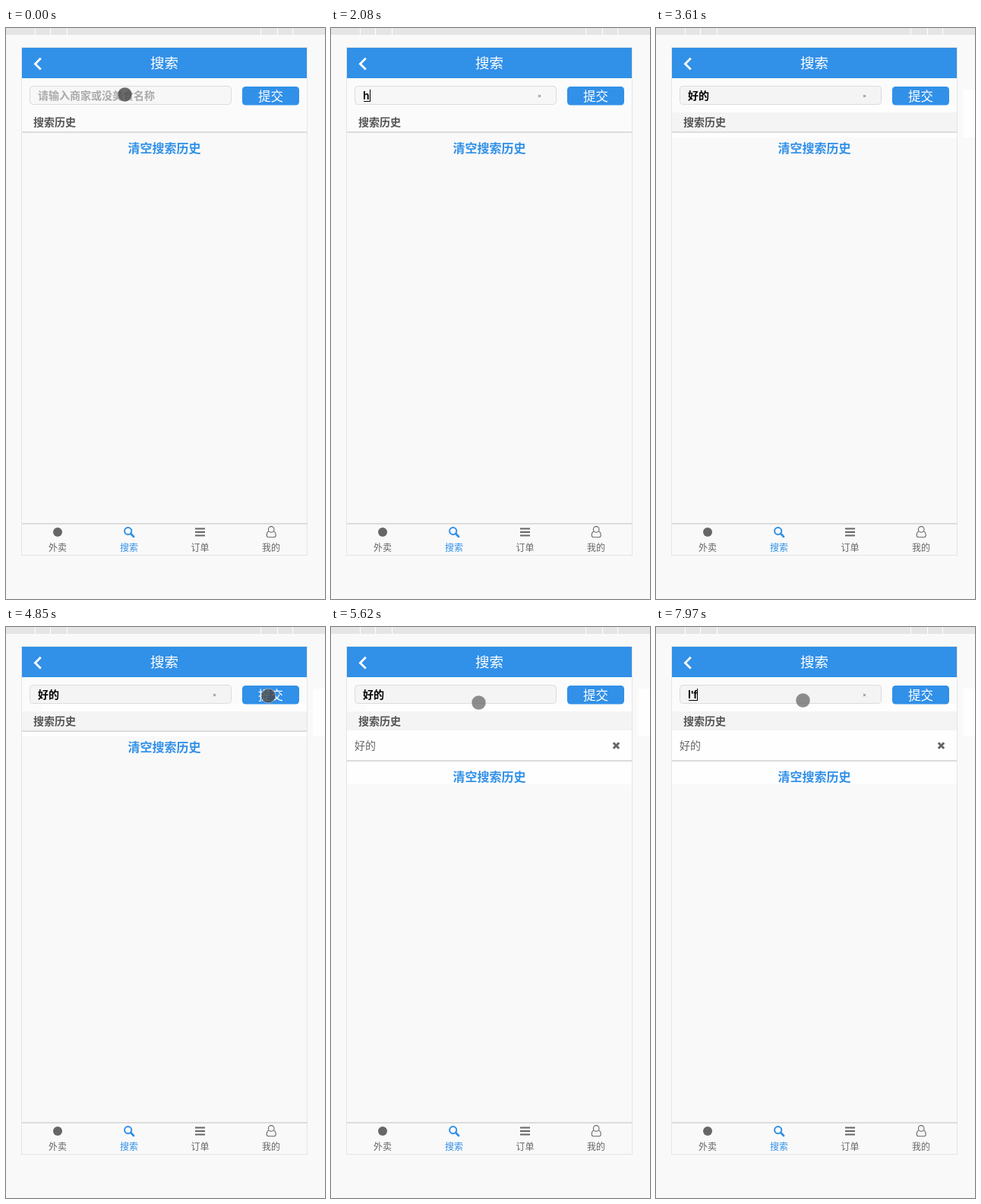
Write an HTML page that moves like this. It is 420 by 751 pixels and loops after 8000 ms.

```html
<!DOCTYPE html>
<html lang="zh-CN">
<head>
<meta charset="utf-8">
<title>搜索</title>
<style>
html, body { margin: 0; width: 100%; height: 100%; overflow: hidden; background: #f9f9f9; }
svg { display: block; width: 420px; height: 751px; }
text { font-family: "Noto Sans CJK SC", "Noto Sans CJK", sans-serif; white-space: pre; }
.bold { font-weight: 700; }
.mid { text-anchor: middle; }
.blue { fill: #3190e8; }
.gray { fill: #666; }
.field { font: 700 14px "Liberation Sans", "Noto Sans CJK SC", "Noto Sans CJK", sans-serif; }
.num { font: 13px "Open Sans", sans-serif; fill: #767676; }
.word { font-size: 17.3px; }
</style>
</head>
<body>
<svg viewBox="0 0 420 751">
  <rect width="420" height="751" fill="#f9f9f9"/>
  <rect width="420" height="9" fill="#e5e5e5"/>
  <path d="M38.5 0V9M58.5 0V9M80.5 0V9M335.5 0V9M357.5 0V9M377.5 0V9" stroke="#fff"/>

  <rect x="21" y="66" width="375" height="70" fill="#fbfbfb"/>
  <g id="shade">
    <path d="M404 81H420V144H404ZM46 101H396V111H46ZM21 138H396V144H21Z" fill="#fefefe"/>
    <rect x="21" y="111" width="375" height="25" fill="#f4f4f5"/>
  </g>
  <rect x="20.5" y="25.5" width="376" height="668" fill="none" stroke="#e5e5e5"/>

  <rect x="21" y="26" width="375" height="40" class="blue"/>
  <path d="M45.8 39.8L38.4 47.2L45.8 54.6" fill="none" stroke="#fff" stroke-width="2.8"/>
  <text x="208.5" y="53" font-size="18.5" class="mid" fill="#fff">搜索</text>

  <rect id="box" x="31.5" y="76.5" width="265" height="24" rx="4" stroke="#dcdcdc"/>
  <text id="hint" x="42" y="94" font-size="14" class="bold" fill="#aaa">请输入商家或没美食名称</text>
  <text id="typed" x="42" y="94" class="field"></text>
  <rect id="under" x="43" y="96" height="1"/>
  <rect id="caret" y="81" width="1" height="16"/>
  <path id="clear" d="M273 88L276 91M276 88L273 91" stroke="#555" stroke-width=".9"/>
  <rect x="311" y="77" width="75" height="24.5" rx="4.5" class="blue"/>
  <text x="348.5" y="96" font-size="16.5" class="mid" fill="#fff">提交</text>

  <text x="36" y="129" font-size="14" class="bold" fill="#555">搜索历史</text>
  <g id="item">
    <rect x="21" y="136" width="375" height="71" fill="#fefefe"/>
    <text x="31" y="161" font-size="14" class="gray">好的</text>
    <path d="M371.8 152.3L379.2 159.7M379.2 152.3L371.8 159.7" stroke="#666" stroke-width="3"/>
  </g>
  <g id="foot">
    <rect x="21" y="136" width="375" height="2" fill="#dcdcdc"/>
    <text x="208.5" y="164" font-size="16" class="mid bold blue">清空搜索历史</text>
  </g>

  <rect x="21" y="651" width="375" height="2" fill="#dcdcdc"/>
  <circle cx="68" cy="663" r="6" class="gray"/>
  <g fill="none" stroke="#3190e8">
    <circle cx="160.7" cy="661.6" r="4.6" stroke-width="2"/>
    <path d="M164.2 665.1L168 668.9" stroke-width="2.8" stroke-linecap="round"/>
  </g>
  <path d="M249 658.5H262M249 663H262M249 667.5H262" stroke="#666" stroke-width="2.2"/>
  <g fill="none" stroke="#666" stroke-width="1.1">
    <circle cx="349.2" cy="659.4" r="3.8"/>
    <path d="M346 662C343.9 662.6 343.3 665 343.3 667.3Q343.3 669.7 345.5 669.7H353Q355.2 669.7 355.2 667.3C355.2 665 354.5 662.6 352.4 662"/>
  </g>
  <g font-size="12" class="mid gray">
    <text x="68" y="688">外卖</text>
    <text x="162" y="688" class="blue">搜索</text>
    <text x="255.5" y="688">订单</text>
    <text x="349" y="688">我的</text>
  </g>

  <g id="ime">
    <rect x="50" y="101" width="10" height="43" fill="#fefefe"/>
    <rect x="60" y="100" width="360" height="44" fill="#fff"/>
    <path d="M60 100.5H420M60 143.5H420" stroke="#0078d7"/>
    <rect x="60" y="100" width="78" height="44" fill="#0078d7"/>
    <g id="words"></g>
    <path d="M397 120H405M397 123.5H405M397 127H405" stroke="#111" stroke-width="1.1"/>
  </g>
  <circle id="pointer" r="9.5"/>
</svg>
<script>
const LOOP = 8000;
const $ = id => document.getElementById(id);
const show = (id, on) => $(id).setAttribute("visibility", on ? "visible" : "hidden");
const set = (id, attrs) => {
  for (const k in attrs) $(id).setAttribute(k, attrs[k]);
};

// Latest entry whose start time has passed
const at = (track, t) => track.filter(e => e[0] <= t).pop();

// start, text, composing
const typing = [
  [0, ""], [2080, "h", true], [2230, "h'd", true], [3110, "好的"],
  [6650, "好"], [6770, ""], [7970, "l'f", true]
];
// start, x, y, pressed
const moves = [
  [0, 156.5, 87.5, true], [150, 411, 127], [270],
  [4610, 411, 127], [4730, 350, 89], [4850, 345.5, 90.5, true],
  [5230, 342.5, 92.5], [5380, 342.5, 103], [5500, 250, 102],
  [5620, 194.5, 99.5], [5740, 193.5, 96.5]
];
// Each time flips the caret, which begins hidden
const blinks = [150, 540, 1050, 1550, 2080, 2730, 3110, 3610, 4110, 4610, 6010, 6510, 6650, 7300, 7830];

const words = [["好的", 77, 87], ["很多", 154, 164.5], ["活动", 231, 241], ["好多", 308, 318.5], ["", 385, 0]];
$("words").innerHTML = words.map(([w, x, wx], i) => {
  const ink = i ? "" : ' style="fill:#fff"';
  return `<text class="num" x="${x}" y="129"${ink}>${i + 1}</text>` +
         `<text class="word" x="${wx}" y="129"${ink}>${w}</text>`;
}).join("");

let last = null;
function render(t) {
  const [, text, composing] = at(typing, t);
  if (text !== last) {
    $("typed").textContent = last = text;
  }
  const width = text ? $("typed").getComputedTextLength() : 0;
  show("hint", !text);
  show("clear", text && !(t >= 5230 && t < 6010));
  show("under", composing);
  set("under", { width: Math.max(0, Math.round(width) - 1) });
  set("caret", { x: 42 + Math.round(width) });
  show("caret", blinks.filter(b => b <= t).length % 2);

  const added = t >= 5230;
  show("ime", t >= 2230 && t < 3110);
  show("shade", t >= 3110);
  set("box", { fill: t >= 3110 ? "#f4f4f5" : "#f7f7f7" });
  show("item", added);
  set("foot", { transform: `translate(0 ${added ? 39 : 0})` });

  const [, x, y, pressed] = at(moves, t);
  show("pointer", x);
  if (x) set("pointer", {
    cx: x, cy: y,
    fill: pressed ? "#444" : "#666",
    "fill-opacity": pressed ? 0.78 : 0.74,
    stroke: "#fff", "stroke-opacity": 0.4
  });
}

const start = performance.now();
function tick() {
  render((performance.now() - start) % LOOP);
  requestAnimationFrame(tick);
}
tick();
</script>
</body>
</html>
```
